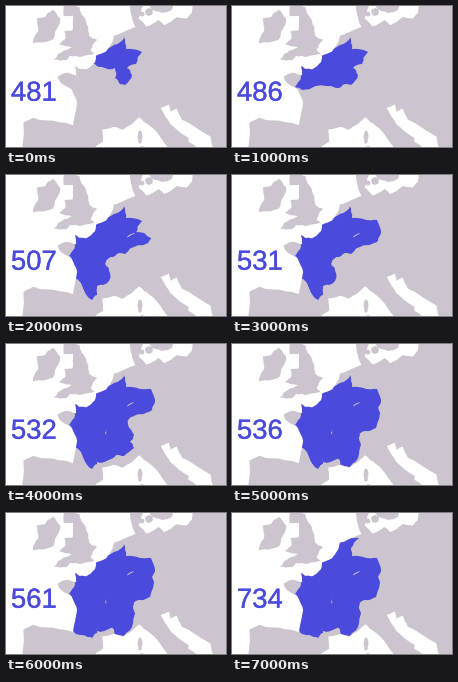
Write a matplotlib script that moves like this. It is 220 px wide and 141 px high and loops after 8 s.

```python
import numpy as np
import matplotlib.pyplot as plt
from matplotlib.animation import FuncAnimation
from matplotlib.patches import Polygon
from matplotlib.patheffects import withStroke

W, H, DPI = 220, 141, 100
LAND, BLUE = "#ccc4ce", "#4a4adc"
rng = np.random.default_rng(5)

# Key points of the coasts as (longitude, latitude)
ATLANTIC = [
    (8.2, 57.5), (8.1, 55.5), (8.9, 54), (7, 53.6), (4.8, 53.1), (4.3, 52.2),
    (3.4, 51.4), (1.6, 50.9), (1.5, 50.2), (0, 49.4), (-1.2, 49.4),
    (-1.9, 49.7), (-1.6, 48.7), (-3.2, 48.9), (-4.7, 48.4), (-4.3, 47.9),
    (-2.2, 47.2), (-1.1, 45.8), (-1.5, 43.4), (-5.8, 43.65), (-7.8, 43.75),
    (-9.1, 43.1), (-8.7, 38.5),
]
MEDITERRANEAN = [
    (0, 39.5), (3.2, 41.8), (3.05, 43.1), (4.8, 43.4), (6.2, 43.1),
    (8.8, 44.4), (10.3, 43.5), (12.2, 41.8), (15, 39.5), (18.4, 40),
    (16, 41.5), (16.1, 41.9), (13.6, 43.5), (12.3, 45.3), (13.6, 45.6),
    (13.8, 44.8), (14.8, 45.1), (15.4, 43.9), (19.4, 41.8), (20, 39), (24, 36),
]
BALTIC = [
    (34, 55), (21, 56.5), (20, 54.9), (18.8, 54.4), (17, 54.7), (14.4, 54),
    (13.4, 54.6), (11, 54), (9.6, 54.9), (10.8, 56.3), (10.4, 57.5),
]
BRITAIN = [
    (-5.5, 57), (-5, 54.8), (-3.2, 54.95), (-3, 53.4), (-4.5, 53.2),
    (-4.1, 52.5), (-5.2, 51.8), (-2.8, 51.6), (-4.2, 51.2), (-5.7, 50.1),
    (-3.6, 50.2), (-3, 50.7), (-1, 50.7), (1.3, 51.1), (0.6, 51.5),
    (1.7, 52.6), (0.2, 53), (-0.1, 53.9), (-1.6, 55.2), (-2.1, 55.9),
    (-3.2, 56), (-2.5, 57),
]
IRELAND = [
    (-7.3, 55.3), (-5.6, 54.5), (-6.1, 53.2), (-6.4, 52.2), (-9.8, 51.5),
    (-9.3, 52.8), (-10, 54.1), (-8.5, 54.4),
]

# Each year with the lands it adds, in pixels; the coast trims the sea sides
GAINS = {
    481: [(86, 49), (99, 43), (108, 39), (113, 37), (118, 31), (120, 43),
          (136, 46), (130, 58), (121, 62), (126, 69), (119, 79), (114, 78),
          (109, 72), (109, 62), (96, 61), (86, 57)],
    486: [(86, 55), (96, 59), (109, 60), (121, 62), (121, 76), (113, 78),
          (104, 82), (84, 80), (70, 84), (63, 81), (69, 71), (65, 58),
          (74, 60)],
    507: [(64, 80), (84, 78), (106, 78), (122, 62), (130, 57), (145, 63),
          (142, 68), (122, 74), (114, 77), (103, 83), (99, 89), (104, 98),
          (103, 106), (91, 111), (91, 120), (86, 125), (77, 113), (71, 104),
          (64, 103)],
    531: [(132, 46), (145, 45), (149, 56), (146, 66), (137, 69), (127, 60)],
    532: [(97, 79), (121, 73), (122, 81), (128, 91), (124, 98), (128, 104),
          (118, 112), (111, 111), (105, 115), (91, 118), (89, 110), (99, 104)],
    536: [(120, 70), (146, 64), (144, 84), (134, 87), (126, 91), (127, 110),
          (118, 123), (110, 123), (104, 111), (120, 104)],
    561: [(63, 101), (72, 102), (80, 110), (86, 124), (70, 121), (63, 116)],
    734: [(88, 49), (99, 36), (106, 30), (119, 25), (127, 25), (119, 35),
          (118, 42), (105, 46)],
}
YEARS = list(GAINS)


def project(points):
    lon, lat = np.array(points).T
    x = 109 + 8.9 * (lon - 5) * np.cos(np.radians(lat))
    y = 111.5 - 9.4 * (lat - 44.4) - 0.03 * (lon - 6) ** 2
    return np.column_stack([x, y])


def blob(cx, cy, rx, ry):
    a = np.linspace(0, 2 * np.pi, 8, endpoint=False)
    return np.column_stack([cx + rx * np.cos(a), cy + ry * np.sin(a)])


def roughen(points, amount, rounds=2):
    """Push the middle of every edge sideways, again and again."""
    p = np.array(points, float)
    for _ in range(rounds):
        edge = np.roll(p, -1, axis=0) - p
        normal = np.column_stack([-edge[:, 1], edge[:, 0]])
        mid = p + edge / 2 + normal * rng.uniform(-amount, amount, (len(p), 1))
        p = np.stack([p, mid], axis=1).reshape(-1, 2)
    return p


def add_shape(points, color, amount, z):
    return ax.add_patch(Polygon(roughen(points, amount), closed=True,
                                fc=color, ec="none", zorder=z))


fig = plt.figure(figsize=(W / DPI, H / DPI), dpi=DPI, facecolor="white")
ax = fig.add_axes([0, 0, 1, 1])
ax.set_xlim(0, W)
ax.set_ylim(H, 0)
ax.axis("off")

mainland = add_shape(project(ATLANTIC + MEDITERRANEAN + BALTIC), LAND, 0.06, 1)
islands = [
    project(BRITAIN), project(IRELAND),
    blob(156, -4, 14, 11),   # Scania
    blob(143, 6, 4, 4),      # Zealand
    blob(136, 8, 2.5, 2.5),  # Funen
    blob(134, 131, 2.5, 7),  # Corsica
    blob(136, 146, 5, 6),    # Sardinia
]
for island in islands:
    add_shape(island, LAND, 0.1, 1)

realm = [add_shape(land, BLUE, 0.14, 2) for land in GAINS.values()]
for land in realm:
    land.set_clip_path(mainland)

label = ax.text(4.9, 94.7, "", color=BLUE, family="Liberation Sans",
                size=27.5 * 72 / DPI, va="baseline", zorder=3,
                path_effects=[withStroke(linewidth=0.25, foreground=BLUE)])


def update(i):
    label.set_text(str(YEARS[i]))
    for step, land in enumerate(realm):
        land.set_visible(step <= i)
    return [label]


anim = FuncAnimation(fig, update, frames=len(YEARS), interval=1000,
                     init_func=lambda: update(0), repeat=True, repeat_delay=0)
plt.show()
```
